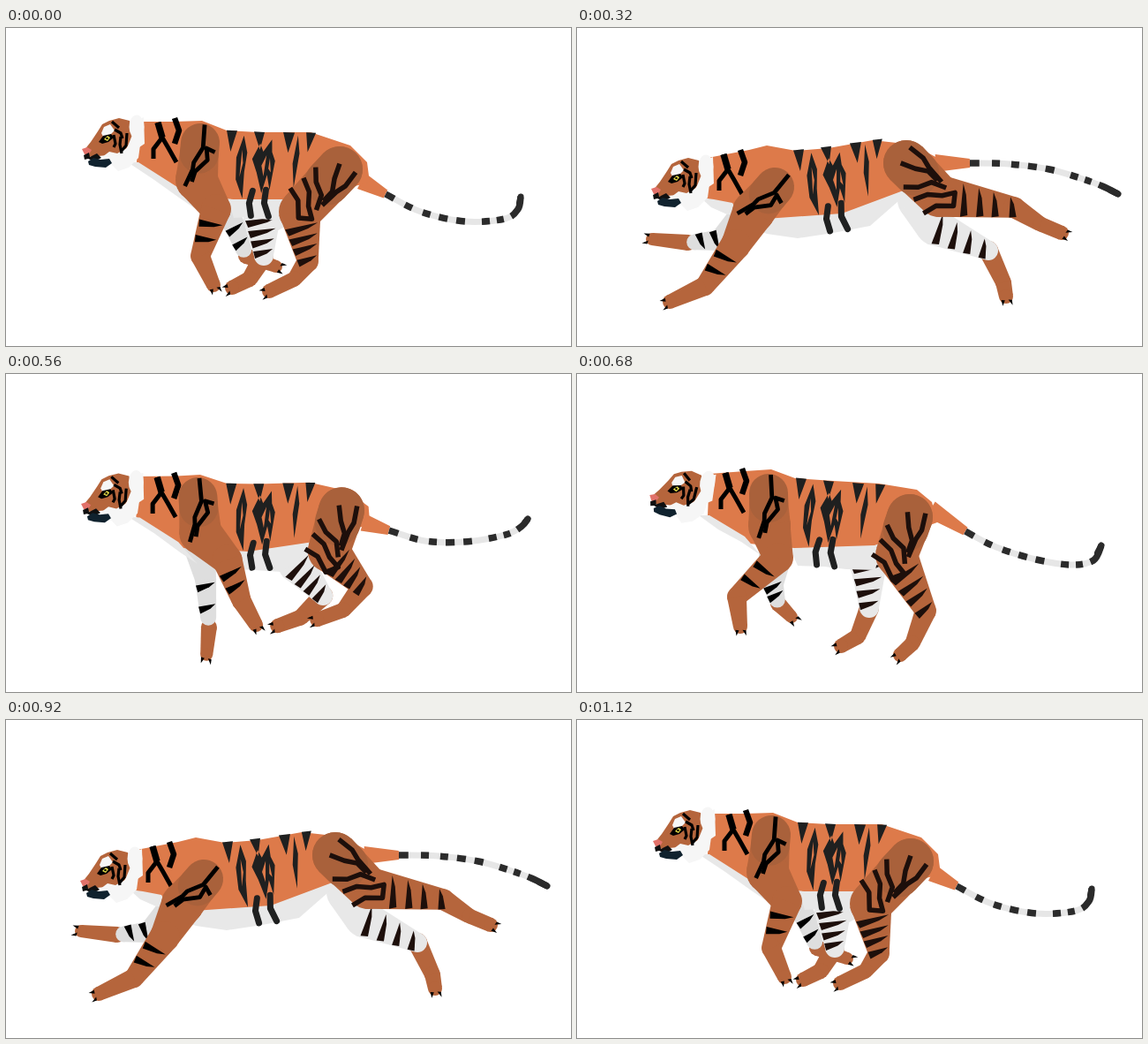
An HTML page that plays this animation: 640 px wide and 360 px high, repeating every 1.16 s.

```html
<!DOCTYPE html>
<html lang="en">
<head>
<meta charset="utf-8">
<title>Running tiger</title>
<style>
html, body { margin: 0; width: 100%; height: 100%; overflow: hidden; background: #fff; }
svg { display: block; width: 100vw; height: 100vh; }
</style>
</head>
<body>
<svg id="stage" viewBox="0 0 640 360"></svg>
<script>
const STEP = 40, STEPS = 29, STRIDE = 15;
const KEY_TIMES = [0, 2, 4, 8, 12, 13.5];
const COLOR = { coat: '#dd7a4a', limb: '#b5653c', joint: '#a9613b', belly: '#e8e8e8', farLeg: '#dedede',
  ink: '#1f2020', thighInk: '#1d0f0b', face: '#f6f6f6' };

// One pose per "|", in the order of KEY_TIMES.
const poses = text => text.split('|').map(p => p.trim().split(/[ ,]+/).map(Number));

const body = {
  torso: poses(`150 106,190 106,222 105,250 116,285 118,345 118,390 133,409 152,412 175,330 194,258 194,194 188,148 152|
    150 113,190 110,220 108,247 118,290 121,342 124,385 131,402 145,408 168,337 194,246 197,195 192,148 160|
    146 131,186 121,216 119,245 125,285 126,340 124,375 131,398 142,412 160,352 190,244 203,200 204,146 178|
    148 147,195 138,215 133,248 139,285 136,335 127,380 132,410 148,412 162,375 182,300 210,185 218,146 192|
    150 140,200 137,215 134,248 141,290 139,340 134,380 131,412 144,412 158,383 182,305 216,185 216,146 186`),
  belly: poses(`200 180,250 190,258 215,275 214,305 218,315 212,330 190|
    200 180,240 195,250 217,280 218,305 221,338 222,345 185|
    205 200,215 238,237 235,275 224,320 224,365 232,372 185|
    180 205,190 222,215 233,250 238,290 232,332 224,380 182|
    185 205,200 228,225 238,270 239,325 237,365 215,390 180`),
  chest: poses(`138 152,150 152,194 180,215 205,196 192,168 172|
    138 160,150 160,190 184,208 205,186 190,160 176|
    140 178,152 180,195 195,208 215,185 203,160 190|
    140 192,155 194,176 198,185 212,170 211,152 203|
    140 186,155 188,195 212,215 234,195 222,165 200`),
  tail: poses(`402 174,430 188,470 208,520 219,565 216,580 205,583 191|
    400 154,440 178,475 196,520 210,560 216,585 211,594 194|
    396 148,445 168,485 192,520 210,560 226,585 233,603 230|
    406 154,445 153,490 154,535 160,570 170,595 179,613 188|
    408 152,445 151,490 146,530 127,570 113,595 110,612 114`),
  head: poses('114 125 0|112 130 10|110 154 0|112 170 0|111 160 4'),
  flank: poses('255 116 .05 -.07|253 118 .1 -.11|251 126 0 0|250 138 -.11 .08|252 141 -.06 0'),
  neck: poses('172 107|168 112|166 127|166 143|168 140')
};

const legs = {
  farFront: poses(`235 190,258 222,272 258,306 270|225 205,222 238,228 260,243 275|
    220 215,205 240,189 255,189 276|190 215,162 240,126 243,85 239|
    197 212,183 262,160 310,135 331|210 195,208 240,205 300,185 338`),
  farHind: poses(`335 190,290 215,292 258,276 284,256 294|350 190,330 215,331 265,318 297,299 308|
    365 200,352 228,380 268,372 300,350 309|385 195,405 225,466 252,483 288,486 304|
    395 190,420 210,494 214,513 245,526 259|370 190,355 215,400 245,375 270,350 280`),
  nearHind: poses(`378 160,333 208,342 264,327 284,298 298|377 162,362 205,395 268,380 305,366 318|
    377 160,398 200,444 270,446 308,432 320|373 153,410 190,495 203,525 222,549 232|
    372 152,420 178,508 173,530 198,548 212|380 152,385 195,440 225,420 255,395 265`),
  nearFront: poses(`220 130,216 172,238 205,220 258,235 291|217 135,218 172,228 208,181 252,185 286|
    216 145,218 185,224 222,150 253,138 270|224 180,200 208,180 245,145 292,105 310|
    215 162,220 200,250 238,286 285,284 324|216 145,222 185,255 215,285 258,300 285`)
};

// Periodic cubic through the key poses.
function sample(keys, time) {
  const n = keys.length;
  const at = i => KEY_TIMES[(i + n) % n] + STRIDE * Math.floor(i / n);
  const key = i => keys[(i + n) % n];
  let i = n - 1;
  while (KEY_TIMES[i] > time) i--;
  const span = at(i + 1) - at(i), u = (time - at(i)) / span;
  const slope = (j, c) => (key(j + 1)[c] - key(j - 1)[c]) / (at(j + 1) - at(j - 1));
  return key(i).map((a, c) => {
    const b = key(i + 1)[c];
    return a + (b - a) * u * u * (3 - 2 * u)
      + span * u * (1 - u) * ((1 - u) * slope(i, c) - u * slope(i + 1, c));
  });
}

const pairs = list => Array.from({ length: list.length / 2 }, (_, i) => [list[2 * i], list[2 * i + 1]]);
const shape = (d, fill) => `<path d="${d}" fill="${fill}"/>`;
const poly = (points, fill) => shape(`M${points}Z`, fill);
const line = (d, width, color, extra = '') =>
  `<path d="${d}" fill="none" stroke="${color}" stroke-width="${width}" stroke-linejoin="round" ${extra}/>`;
const group = (transform, content) => `<g transform="${transform}">${content}</g>`;
const lerp = (a, b, t) => a.map((v, i) => v + (b[i] - v) * t);

function axis(a, b) {
  const dx = b[0] - a[0], dy = b[1] - a[1], len = Math.hypot(dx, dy) || 1;
  return [dx / len, dy / len];
}
// Point placed along and across a direction.
const offset = (p, [x, y], along, across) =>
  [p[0] + x * along - y * across, p[1] + y * along + x * across];

function limb(joints, radii, fill) {
  return joints.map((p, i) => {
    const r = radii[i], next = joints[i + 1];
    let out = `<circle cx="${p[0]}" cy="${p[1]}" r="${r}" fill="${fill}"/>`;
    if (next) {
      const d = axis(p, next), s = radii[i + 1];
      out += poly([offset(p, d, 0, r), offset(next, d, 0, s), offset(next, d, 0, -s), offset(p, d, 0, -r)], fill);
    }
    return out;
  }).join('');
}

function bands(a, b, ra, rb, places, color) {
  const d = axis(a, b);
  return places.map(t => {
    const p = lerp(a, b, t), r = ra + (rb - ra) * t;
    return poly([offset(p, d, -2, r), offset(p, d, 6, r * .85), offset(p, d, 1, -r * .3), offset(p, d, -4, -r * .9)], color);
  }).join('');
}

function claws(ankle, paw) {
  const d = axis(ankle, paw);
  return [[5, -4], [4, 4]].map(([x, y]) =>
    poly([offset(paw, d, x, y - 2), offset(paw, d, x + 6, y * 1.4), offset(paw, d, x - 1, y + 2)], '#000')).join('');
}

function upperJoint(a, b, r) {
  return line(`M${a}L${lerp(a, b, .3)}`, 2 * r, COLOR.joint, 'stroke-linecap="round"');
}

// Markings drawn for one limb direction, turned with the limb.
function turned(a, b, home, homeAngle, content) {
  const angle = Math.atan2(b[1] - a[1], b[0] - a[0]) * 180 / Math.PI;
  return group(`translate(${a}) rotate(${angle - homeAngle}) translate(${-home[0]} ${-home[1]})`, content);
}

function farLegs(time) {
  const f = pairs(sample(legs.farFront, time)), h = pairs(sample(legs.farHind, time));
  const fr = [19, 12, 9, 7], hr = [22, 21, 11, 9, 8];
  return limb(f.slice(2), fr.slice(2), COLOR.limb) + claws(f[2], f[3])
    + limb(f.slice(0, 2).concat([lerp(f[1], f[2], .8)]), [19, 12, 9], COLOR.farLeg)
    + bands(f[1], f[2], 12, 9, [.15, .6], '#000')
    + limb(h.slice(2), hr.slice(2), COLOR.limb) + claws(h[3], h[4])
    + limb(h.slice(0, 3), hr, COLOR.belly)
    + bands(h[1], h[2], 20, 11, [.1, .38, .65, .92], COLOR.thighInk);
}

const thighMarks = ['M386 144L397 160L400 172L409 192', 'M371 158L385 169L398 176L405 189',
  'M366 185L382 190L398 189L412 200', 'M373 202L390 201L405 207L420 208L414 222L395 216L379 220']
  .map(d => line(d, 5.5, COLOR.thighInk)).join('');

const shoulderMarks = ['M218 124L220 150L212 168L212 176L206 196', 'M234 153L224 150L227 163L215 178L213 190']
  .map(d => line(d, 4.8, '#000')).join('');

function nearHind(time) {
  const j = pairs(sample(legs.nearHind, time)), r = [26, 24, 12, 8.5, 8];
  return limb(j, r, COLOR.limb) + upperJoint(j[0], j[1], 26)
    + turned(j[0], j[1], [377, 160], 62, thighMarks)
    + bands(j[1], j[2], 24, 12, [.34, .55, .75, .98], COLOR.thighInk) + claws(j[3], j[4]);
}

function nearFront(time) {
  const j = pairs(sample(legs.nearFront, time)), r = [21, 24, 17, 11, 8];
  return limb(j, r, COLOR.limb) + upperJoint(j[0], j[1], 22)
    + turned(j[0], j[1], [216, 145], 87, shoulderMarks)
    + bands(j[2], j[3], 16, 11, [.34, .66], '#000') + claws(j[3], j[4]);
}

function tail(time) {
  const p = pairs(sample(body.tail, time));
  const d = axis(p[0], p[1]);
  let curve = `M${p[1]}`;
  for (let i = 1; i < 6; i++) {
    const after = p[i + 2] || p[i + 1];
    const c1 = p[i].map((v, k) => v + (p[i + 1][k] - p[i - 1][k]) / 6);
    const c2 = p[i + 1].map((v, k) => v - (after[k] - p[i][k]) / 6);
    curve += `C${c1} ${c2} ${p[i + 1]}`;
  }
  const root = poly([offset(p[0], d, 0, 9), offset(p[1], d, 0, 5), offset(p[1], d, 0, -5), offset(p[0], d, 0, -11)], COLOR.coat);
  return root + line(curve, 7, '#e6e6e6')
    + line(curve, 7.5, '#2b2b2b', 'stroke-dasharray="11 14 9 13 9 10 10 10 10 19 9 8 8 9 60"')
    + line(`M${lerp(p[5], p[6], .5)}L${p[6]}`, 7, '#2b2b2b', 'stroke-linecap="round"');
}

const flankMarks = shape(`M246 126L258 126L252 150ZM277 126L289 126L285 146ZM310 125L323 125L317 148ZM336 124L347 124L339 146Z
  M266 131L271 150L269 172L269 202L260 181L259 156ZM265 147L264 178L267 162Z
  M285 139L289 148L298 134L299 148L303 158L299 191L295 174L290 195L283 172L277 157ZM293 152L288 164L291 176ZM297 155L296 167L299 171Z
  M327 128L330 148L326 187L323 160Z`, COLOR.ink).replace('<path', '<path fill-rule="evenodd"')
  + line('M280 193L277 207L280 221M295 191L294 206L300 221', 7, COLOR.ink, 'stroke-linecap="round"');

const neckMarks = line('M166 127L171 144L161 157L161 168M171 144L178 156L187 172', 5, '#000')
  + line('M185 122L190 136L185 151', 6.5, '#000')
  + line('M166 127L171 144', 7.5, '#000');

const headArt =
  poly([138, 136, 152, 130, 153, 160, 138, 170], COLOR.face)
  + poly([84, 168, 92, 158, 100, 146, 105, 138, 113, 134, 124, 131, 136, 134, 141, 152, 128, 172, 112, 173, 88, 175], COLOR.limb)
  + poly([113, 169, 122, 171, 133, 165, 139, 150, 149, 154, 146, 176, 135, 187, 123, 191, 115, 183, 105, 175], COLOR.face)
  + '<ellipse cx="144" cy="141" rx="8.5" ry="13.5" fill="#f6f6f6"/>'
  + poly([104, 148, 107, 141, 114, 138, 119, 145, 114, 150, 106, 152], COLOR.face)
  + poly([82, 166, 88, 164, 93, 167, 90, 172, 85, 172], '#e2726a')
  + poly([84, 173, 90, 170, 91, 175, 99, 171, 104, 176, 96, 180, 89, 177, 85, 178], '#101010')
  + poly([89, 180, 95, 176, 103, 178, 113, 177, 116, 182, 109, 187, 97, 186, 90, 184], '#10222e')
  + line('M116 135L124 142M119 144L126 148L128 154M118 150L120 160L118 164M126 152L125 161L127 171M133 148L132 162L127 168', 3.2, '#000')
  + poly([101, 158, 106, 151, 115, 149, 118, 153, 112, 158, 105, 160], '#000')
  + poly([107, 155, 111, 151, 114, 153, 111, 157], '#e9e04a')
  + '<circle cx="110.500" cy="154" r="1.300" fill="#000"/>';

function drawTiger(time) {
  const [hx, hy, tilt] = sample(body.head, time);
  const [fx, fy, rise, lean] = sample(body.flank, time);
  const [nx, ny] = sample(body.neck, time);
  return farLegs(time)
    + poly(sample(body.belly, time), COLOR.belly)
    + tail(time)
    + poly(sample(body.torso, time), COLOR.coat)
    + poly(sample(body.chest, time), COLOR.belly)
    + group(`matrix(1 ${rise} ${lean} 1 ${fx} ${fy}) translate(-251 -126)`, flankMarks)
    + group(`translate(${nx - 166} ${ny - 127})`, neckMarks)
    + nearHind(time) + nearFront(time)
    + group(`translate(${hx} ${hy}) rotate(${tilt}) translate(-110 -154)`, headArt);
}

// Two strides; the second is cut short to close the loop.
function strideTime(step) {
  if (step === STEPS - 1) return 0;
  if (step === STEPS - 2) return 12.5;
  return step % STRIDE;
}

const stage = document.getElementById('stage');
const start = performance.now();
let shown = -1;
function tick() {
  const step = Math.floor((performance.now() - start) / STEP) % STEPS;
  if (step !== shown) stage.innerHTML = drawTiger(strideTime(shown = step));
  requestAnimationFrame(tick);
}
tick();
</script>
</body>
</html>
```
